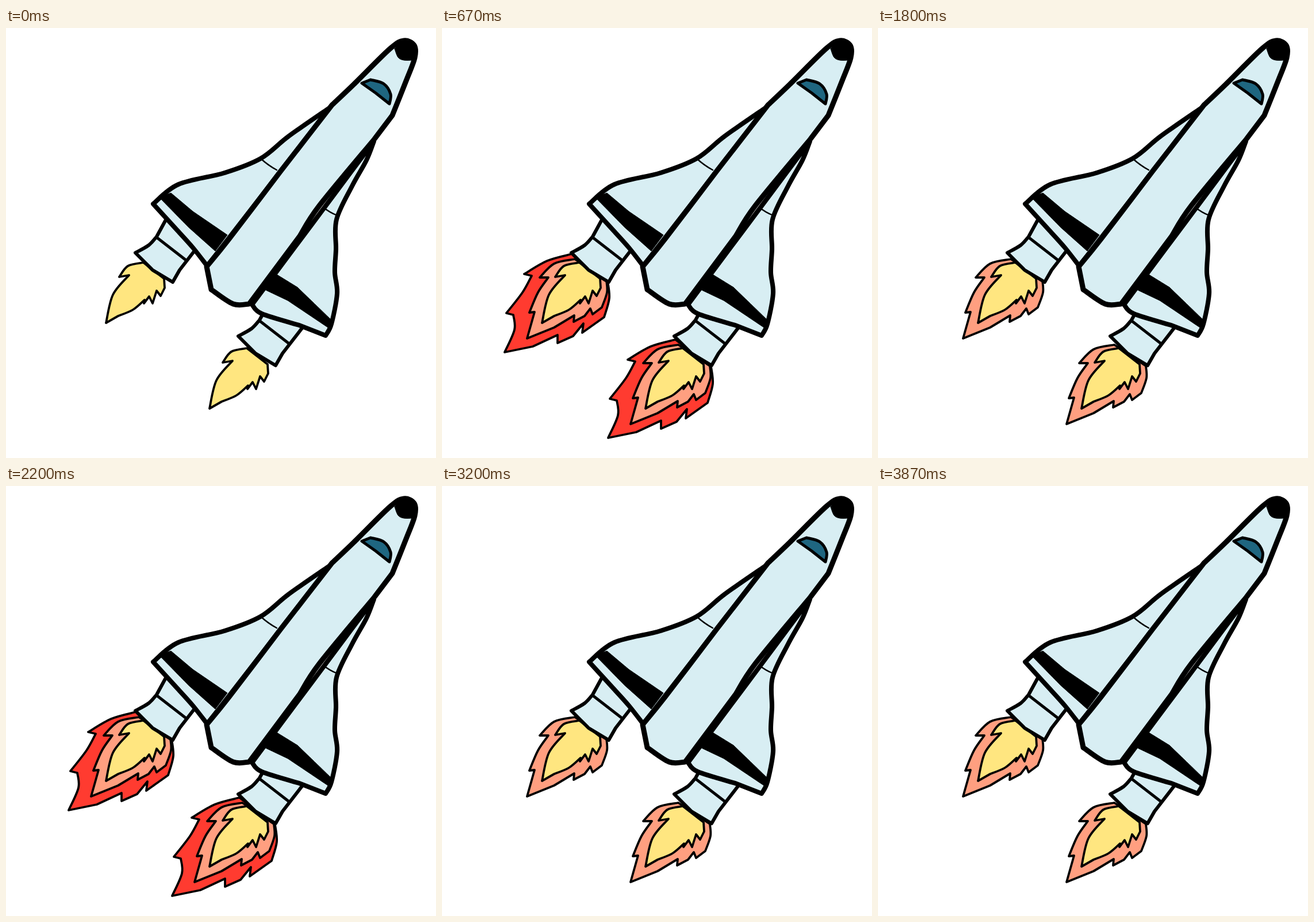
An HTML page for the animation above (4190 ms loop, 748 by 748 pixels).

```html
<!DOCTYPE html>
<html lang="en">
<head>
<meta charset="utf-8">
<title>Shuttle</title>
<style>
html, body { margin: 0; width: 100%; height: 100%; overflow: hidden; background: #fff; }
svg { display: block; width: 100vw; height: 100vh; }
</style>
</head>
<body>
<svg id="stage" viewBox="0 0 748 748" stroke="#000" stroke-linejoin="round" stroke-linecap="round"></svg>
<script>
const stage = document.getElementById('stage');
const INK = '#000', PALE = '#d8eef3', GLASS = '#1f6680';

// Closed outline; each run between bars starts at a corner and is smooth inside.
function outline(text) {
  const runs = text.split('|').map(r => r.trim().split(/\s+/).map(p => p.split(',').map(Number)));
  let d = 'M' + runs[0][0];
  runs.forEach((run, i) => {
    const pts = [...run, runs[(i + 1) % runs.length][0]];
    for (let k = 0; k < pts.length - 1; k++) {
      const b = pts[k], c = pts[k + 1], a = pts[k - 1] || b, e = pts[k + 2] || c;
      const p = b.map((v, j) => v + (c[j] - a[j]) / 6);
      const q = c.map((v, j) => v - (e[j] - b[j]) / 6);
      d += `C${p} ${q} ${c}`;
    }
  });
  return d + 'Z';
}

function add(parent, tag, attrs) {
  const el = document.createElementNS('http://www.w3.org/2000/svg', tag);
  for (const k in attrs) el.setAttribute(k, attrs[k]);
  return parent.appendChild(el);
}
const shape = (parent, fill, width, text) =>
  add(parent, 'path', { d: outline(text), fill, 'stroke-width': width });
const line = (parent, width, d) =>
  add(parent, 'path', { d, fill: 'none', 'stroke-width': width });

// Draws the same part on the left and, shifted, on the right.
function pair(dx, dy, build) {
  const both = add(stage, 'g', {});
  for (const shift of [[0, 0], [dx, dy]]) {
    build(add(both, 'g', { transform: `translate(${shift})` }));
  }
  return both;
}

// Flame layers, largest first
const flames = [
  ['#ff3b30', `226,393 183,405 | 143,428 | 156,431 140,460 | 112,496 | 124,499 126,525
    | 109,564 | 158,554 | 201,534 | 201,548 | 228,536 | 246,514 | 244,530 | 282,503 291,470 | 288,440`],
  ['#ff9f80', `231,402 195,410 | 170,434 | 185,434 167,460 | 152,495 | 161,494
    | 148,540 | 195,521 | 230,500 | 229,511 | 248,501 | 258,488 | 262,498 | 278,486 287,460 | 286,439`],
  ['#ffe680', `239,408 212,414 | 197,433 | 214,430 186,464 | 174,513 | 195,501 221,490
    | 241,473 | 240,479 | 249,467 | 255,479 | 262,457 | 269,466 | 276,452 | 275,436`]
].map(([fill, text]) => pair(180, 149, g => shape(g, fill, 3.8, text)));

// Engines
pair(179, 145, g => {
  shape(g, PALE, 6, '280,330 | 262,363 248,378 | 225,391 | 255,421 | 290,442 | 302,421 | 340,372');
  line(g, 5, 'M263 365L312 403');
});

// Left wing with its band
shape(stage, PALE, 8, '564,138 492,188 443,227 380,252 300,272 | 256,306 | 298,352 325,382 | 350,414');
shape(stage, INK, 1, '266,294 | 287,287 | 325,319 | 385,360 | 364,388 | 318,347');
line(stage, 2.4, 'M443 227Q456 239 471 247');

// Right wing with its band
shape(stage, PALE, 8, `640,197 627,230 602,275 575,333 574,385 572,425 576,462 566,515
  | 556,535 | 510,517 445,497 | 428,481`);
shape(stage, INK, 1, '468,427 | 507,451 | 566,508 | 560,521 | 490,474 | 450,455');
line(stage, 2.4, 'M552 312Q563 321 576 326');

// Body, nose and window
shape(stage, PALE, 9, `567,134 | 477,250 388,367 | 349,415 | 357,455 395,480 | 423,480
  | 511,362 545,309 | 641,193 | 672,152 696,92 711,52 710,30 692,22 668,36 605,98`);
shape(stage, INK, 1, '676,36 682,51 692,56 | 707,56 | 713,35 692,20');
shape(stage, GLASS, 5, '619,96 | 634,90 657,97 669,115 | 667,132 | 643,113');

// Flame sizes cycle small, medium, large, medium at these moments.
const LOOP = 4190;
const steps = [0, 330, 670, 1000, 1330, 1800, 2200, 2530, 2800, 3200, 3530, 3870];
const sizes = [1, 2, 3, 2];

function draw(ms) {
  const t = ms % LOOP;
  const size = sizes[(steps.filter(s => s <= t).length - 1) % sizes.length];
  flames.forEach((g, i) => {
    g.setAttribute('visibility', i >= flames.length - size ? 'visible' : 'hidden');
  });
}

const start = performance.now();
function tick() {
  draw(performance.now() - start);
  requestAnimationFrame(tick);
}
tick();
</script>
</body>
</html>
```
